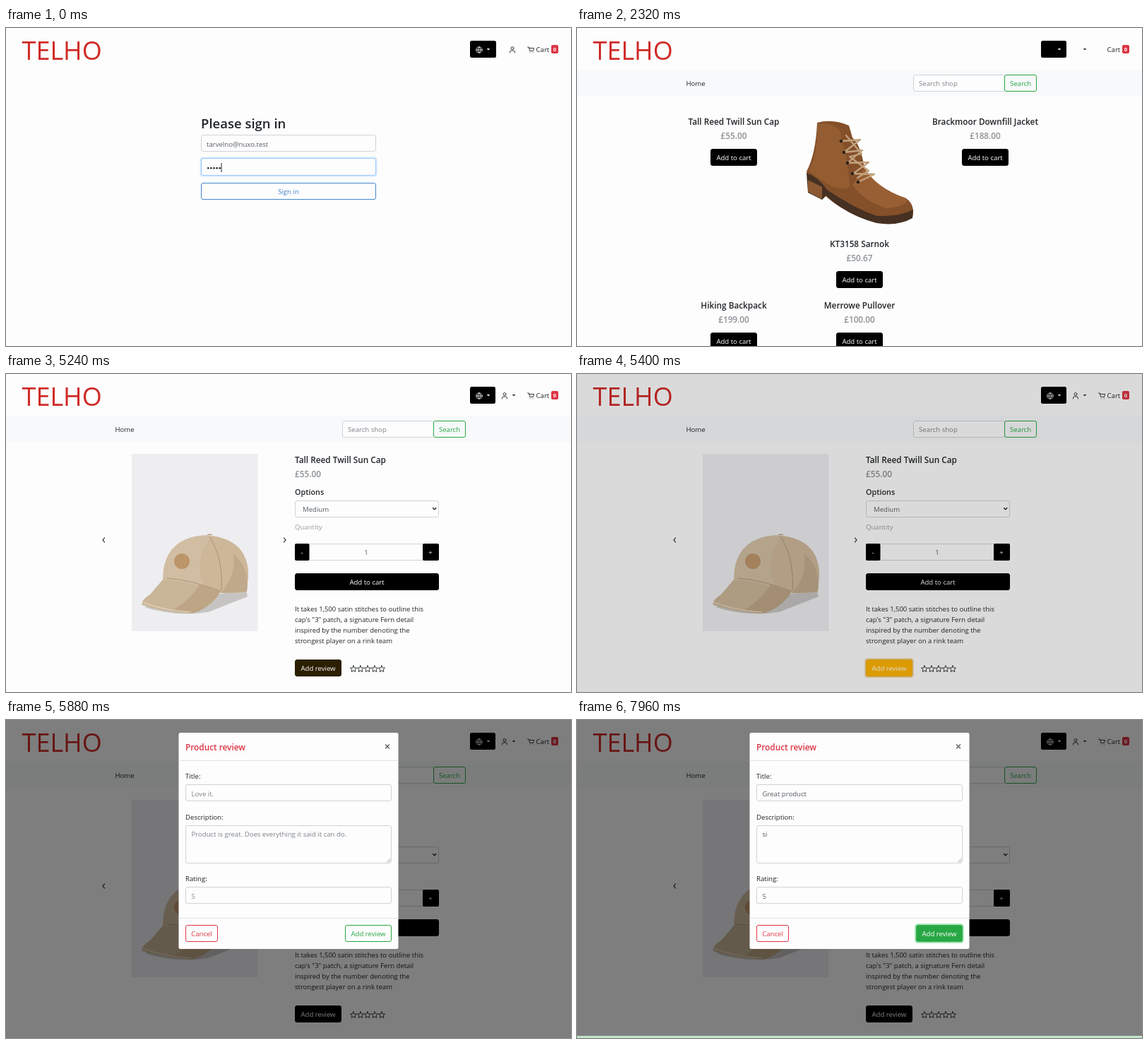
An HTML page for the animation above (8 s loop, 800x450 px).

```html
<!DOCTYPE html>
<html lang="en">
<head>
<meta charset="utf-8">
<title>Shop review</title>
<style>
html, body { margin: 0; width: 100%; height: 100%; overflow: hidden; background: #fdfdfd; }
svg { display: block; width: 800px; height: 450px; font-family: "Open Sans", "Noto Sans", sans-serif; white-space: pre; }
</style>
</head>
<body>
<svg id="stage" viewBox="0 0 800 450"></svg>
<script>
const LOOP = 8000;
const PAGE = '#fdfdfd', INK = '#212529', MUTED = '#7c838a', VALUE = '#565d64', PRICE = '#8c9196', LINE = '#ced4da',
      RED = '#dc3545', GREEN = '#28a745', FOCUS = '#80bdff', FOCUS_GLOW = '#bfdeff';

// Scene times in ms
const SIGN_IN = 1480, LIST = 2240, LOADED = 2400, DETAIL = 3160,
      HOVER_REVIEW = 5215, BACKDROP = 5360, MODAL = 5480, TYPING = 7040,
      DESCRIBE = 7400, RATE = 7520, HOVER_SEND = 7680, TOAST = 7920;

const clamp = v => Math.max(0, Math.min(1, v));
const ramp = (t, start, length) => clamp((t - start) / length);
const easeOut = p => 1 - (1 - p) ** 1.7;
const mix = (a, b, p) => `rgb(${a.map((v, i) => Math.round(v + (b[i] - v) * p))})`;

const rect = (x, y, w, h, fill, extra = '') =>
  `<rect x="${x}" y="${y}" width="${w}" height="${h}" fill="${fill}" ${extra}/>`;
const path = (d, fill = 'none', stroke = 'none', width = 1) =>
  `<path d="${d}" fill="${fill}" stroke="${stroke}" stroke-width="${width}" stroke-linecap="round" stroke-linejoin="round"/>`;
const text = (x, y, s, fill = INK, size = 9.6, weight = 400, anchor = 'start') =>
  `<text x="${x}" y="${y}" fill="${fill}" font-size="${size}" font-weight="${weight}" text-anchor="${anchor}">${s}</text>`;
const label = (x, y, s, fill, size, weight) => text(x, y, s, fill, size, weight, 'middle');
const group = (transform, content, extra = '') => `<g transform="${transform}" ${extra}>${content}</g>`;

const box = (x, y, w, h, stroke = LINE, fill = PAGE) =>
  rect(x + .5, y + .5, w - 1, h - 1, fill, `stroke="${stroke}" rx="2.5"`);
const glow = (x, y, w, h, color) =>
  rect(x - .5, y - .5, w + 1, h + 1, 'none', `stroke="${color}" stroke-width="2.5" stroke-opacity=".5" rx="3"`);
const button = (x, y, w, s, fill = '#000', ink = '#fff', stroke = fill) =>
  box(x, y, w, 24, stroke, fill) + label(x + w / 2, y + 15.5, s, ink);
const caretDown = (x, y, fill) => path(`M${x - 2.3} ${y - 1}h4.6l-2.3 2.5z`, fill);

function header(signedIn, icons) {
  const user = signedIn ? 706 : 717;
  let s = text(22.5, 45, 'TELHO', '#cf2a27', 36)
    + rect(657, 18, signedIn ? 36 : 37, 24, '#000', 'rx="2.5"') + caretDown(683, 30, '#fff')
    + text(750.5, 34, 'Cart') + rect(772, 24, 10, 12, RED, 'rx="2"')
    + label(777, 33, '0', '#fff', 7.5, 700);
  if (signedIn) s += caretDown(719, 30, INK);
  if (icons) s += path('M674.2 31a4.2 4.2 0 1 1-8.4 0a4.2 4.2 0 1 1 8.4 0M665.8 31h8.4M670 26.8q-3.4 4.2 0 8.4q3.4-4.2 0-8.4', 'none', '#fff', .8)
    + path(`M${user - 3.5} 35v-1q0-2 2-2h3q2 0 2 2v1M${user + 2} 28.6a2 2 0 1 1-4 0a2 2 0 1 1 4 0`, 'none', INK, .9)
    + path('M738.5 27h1.8l1.4 5.4h4.8l1-3.9h-6.6M742 34.8v.1M746.3 34.8v.1', 'none', INK, .9);
  return s;
}

const navbar = () => rect(0, 59, 800, 38, '#f8f9fa') + text(154.5, 81.5, 'Home')
  + box(476, 66, 130, 24) + text(484, 82, 'Search shop', MUTED)
  + button(605, 66, 46, 'Search', 'none', GREEN, GREEN);

function login(t) {
  const pressed = t >= SIGN_IN, p = ramp(t, SIGN_IN, 150);
  let s = text(276, 142, 'Please sign in', INK, 18.5, 600)
    + box(276, 151, 248, 24) + text(284, 167.5, 'tarvelno@nuxo.test', VALUE)
    + box(276, 184, 248, 25, pressed ? LINE : FOCUS)
    + (pressed ? '' : glow(276, 184, 248, 25, FOCUS_GLOW));
  for (let i = 0; i < 5; i++) s += `<circle cx="${286.3 + i * 4.1}" cy="198.2" r="1.3" fill="${INK}"/>`;
  if (!pressed && t % 1000 < 500) s += rect(304.5, 191, 1, 13, INK);
  return s + button(276, 219, 248, 'Sign in', mix([253, 253, 253], [40, 125, 215], p),
    mix([64, 128, 200], [255, 255, 255], p), '#4288cc');
}

// Product pictures, each made of a few flat shapes
const capPhoto = rect(178, 113, 178.5, 251, '#eeeef1')
  + path('M196 330Q240 344 286 337L342 315L340 306L240 320Z', '#c6c4c2')
  + path('M222 291Q222 232 282 228Q343 232 343 284L341 308Q300 314 283 303Z', '#d1bea2')
  + path('M291 229Q342 236 343 284L341 308Q310 313 283 303Q262 268 291 229Z', '#cdb799')
  + path('M322 255Q345 273 341 308L304 310Q326 287 322 255Z', '#bfa98b')
  + path('M222 291Q256 293 304 308Q288 333 262 339Q225 337 193 327Q190 321 204 312Z', '#c9b597')
  + path('M304 308Q288 333 262 339L236 335Q262 318 274 298Z', '#bda585')
  + path('M193 323Q225 335 262 337', 'none', '#e5d8c2', 1.2)
  + path('M288 230Q308 260 305 306M228 289Q260 291 303 307', 'none', '#a08a6d', .8)
  + path('M284 228a5 3 0 0 1 9 0z', '#b8a281')
  + '<circle cx="249" cy="265" r="11" fill="#bd956b"/>';

const boot = path('M340 134Q362 128 385 138L390 155Q402 166 407 198Q424 227 466 241Q479 250 475 268Q457 278 426 275Q377 262 350 236Q330 231 325 203Q338 179 340 134Z', '#84502a')
  + path('M340 136Q359 132 372 145L381 181L387 224Q370 237 328 202Q341 178 340 136Z', '#935c31')
  + path('M407 198Q424 227 466 241Q473 251 438 255Q406 245 390 222Z', '#995f34')
  + path('M325 205Q342 211 354 229Q398 258 425 266Q457 267 476 257L475 269Q454 281 424 276Q380 264 353 237L347 243L327 233Z', '#463022')
  + path('M327 215L347 225V242L327 232Z', '#8b5832')
  + path('M375 160L401 158L378 176L404 173L383 191L413 190L391 206L421 207L398 218M381 152L403 178L386 182L413 202L397 212', 'none', '#c1a17d', 2.3)
  + [[374, 160], [378, 176], [383, 191], [390, 206], [398, 218]].map(([x, y]) => `<circle cx="${x}" cy="${y}" r="2.3" fill="#2b211a"/>`).join('');

const jacket = path('M551 128L570 121H587L606 128L626 190L631 268L612 271L602 199L604 285H552L554 199L544 271L525 268L530 190Z', '#535b5c')
  + path('M578 123V284M554 180H602M554 215H602M554 250H602', 'none', '#34393c', 1.3);
const backpack = path('M184 460V420Q185 385 222 385Q259 385 260 420V460Z', '#4d6970')
  + path('M208 389V380Q222 374 236 380V389M194 422H250', 'none', '#293f45', 4);
const pullover = path('M370 391L388 382Q400 391 412 382L430 391L458 460H342Z', '#9b776b')
  + path('M388 382Q400 398 412 382', 'none', '#73574e', 3);

const card = (cx, y, name, price) => label(cx, y + 17, name, INK, 11.8, 600)
  + label(cx, y + 37, price, PRICE, 11.8, 600) + button(cx - 33, y + 51, 66, 'Add to cart');

function list(loaded) {
  const shift = loaded ? 173 : 0;
  let s = boot + card(222, 120 + shift, 'Tall Reed Twill Sun Cap', '£55.00')
    + card(400, 293, 'KT3158 Sarnok', '£50.67')
    + card(578, 120 + shift, 'Brackmoor Downfill Jacket', '£188.00');
  return s + (loaded
    ? group('translate(43 44) scale(.67)', capPhoto) + jacket + backpack + pullover
    : card(222, 380, 'Hiking Backpack', '£199.00') + card(400, 380, 'Merrowe Pullover', '£100.00'));
}

function star(cx, cy) {
  const points = Array.from({ length: 10 }, (_, i) => {
    const a = i * Math.PI / 5 - Math.PI / 2, r = i % 2 ? 2.2 : 4.8;
    return `${(cx + r * Math.cos(a)).toFixed(2)} ${(cy + r * Math.sin(a)).toFixed(2)}`;
  });
  return path(`M${points.join('L')}Z`, 'none', INK, .9);
}

function detail(t) {
  const hover = ramp(t, HOVER_REVIEW, 150) - ramp(t, MODAL + 160, 150);
  let s = capPhoto + path('M139.5 232l-2.5 3l2.5 3M393.5 232l2.5 3l-2.5 3', 'none', '#444', 1.2)
    + text(409, 126, 'Tall Reed Twill Sun Cap', INK, 11.8, 600)
    + text(409, 146, '£55.00', PRICE, 11.8, 600)
    + text(409, 171, 'Options', INK, 10.8, 600)
    + box(409, 179, 204, 24) + text(420, 194.5, 'Medium', VALUE)
    + path('M604.5 189.5l2.2 2.3l2.2-2.3', 'none', INK, 1.3)
    + text(409, 220, 'Quantity', '#999da2')
    + box(409, 240, 204, 24) + rect(409, 240, 20.5, 24, '#000', 'rx="2"') + rect(590, 240, 23, 24, '#000', 'rx="2"')
    + label(419, 255.5, '-', '#fff') + label(601, 256, '+', '#fff') + label(510, 256, '1', VALUE)
    + button(409, 282, 204, 'Add to cart');
  ['It takes 1,500 satin stitches to outline this', 'cap\'s "3" patch, a signature Fern detail',
    'inspired by the number denoting the', 'strongest player on a rink team']
    .forEach((line, i) => s += text(409, 336 + i * 15, line, INK, 9.5));
  s += button(409, 404, 66, 'Add review', mix([0, 0, 0], [255, 180, 0], hover));
  if (t > BACKDROP - 60 && hover > 0) s += glow(409, 404, 66, 24, '#dda63a');
  for (let i = 0; i < 5; i++) s += star(492 + i * 10, 417.5);
  return s;
}

function modal(t) {
  const field = (y, h, from, to) => {
    const focused = t >= from && t < to;
    return box(254, y, 292, h, focused ? FOCUS : LINE) + (focused ? glow(254, y, 292, h, FOCUS_GLOW) : '');
  };
  const entry = (y, start, step, value, placeholder) => {
    const count = Math.floor((t - start) / step);
    return count > 0 ? text(262.5, y, value.slice(0, count), VALUE) : text(262.5, y, placeholder, MUTED);
  };
  const hover = ramp(t, HOVER_SEND, 150);
  const s = rect(244.5, 18, 311, 306, PAGE, 'rx="2.5"')
    + text(254, 42.5, 'Product review', RED, 11.8, 600)
    + path('M537.5 35l5 5m0-5l-5 5', 'none', '#666', 1.6)
    + path('M245 57.5H555M245 280.5H555', 'none', '#dee2e6')
    + text(254, 83, 'Title:') + field(91, 24, TYPING - 30, DESCRIBE - 20)
    + entry(107.5, TYPING, 23, 'Great product', 'Love it.')
    + text(254, 140.5, 'Description:') + field(149, 54, DESCRIBE - 20, RATE - 20)
    + entry(164.5, DESCRIBE, 40, 'si', 'Product is great. Does everything it said it can do.')
    + path('M539.5 201l4.5-4.5M542 201l2-2', 'none', '#888', .8)
    + text(254, 228, 'Rating:') + field(236, 24, RATE - 20, HOVER_SEND + 120)
    + entry(252.5, RATE, 40, '5', '5')
    + button(254, 290, 46, 'Cancel', PAGE, RED, RED)
    + button(480, 290, 66, 'Add review', mix([253, 253, 253], [40, 167, 69], hover),
      mix([40, 167, 69], [255, 255, 255], hover), GREEN)
    + (t >= HOVER_SEND + 120 ? glow(480, 290, 66, 24, '#48c767') : '');
  const lift = -50 * (1 - easeOut(ramp(t, MODAL, 240)));
  return group(`translate(0 ${lift.toFixed(2)})`, s, `opacity="${ramp(t, MODAL + 40, 200)}"`);
}

function scene(t) {
  let s = rect(0, 0, 800, 450, PAGE) + header(t >= LIST, t < LIST || t >= LOADED);
  if (t < LIST) return s + login(t);
  s += navbar() + (t < DETAIL ? list(t >= LOADED) : detail(t));
  if (t >= BACKDROP) s += rect(0, 0, 800, 450, '#000', `opacity="${ramp(t, BACKDROP, 150) / 2}"`);
  if (t >= MODAL) s += modal(t);
  if (t >= TOAST) {
    const h = (t - TOAST) / 40 * 3;
    s += rect(0, 450 - h, 800, h, '#c3e6cb');
  }
  return s;
}

const stage = document.getElementById('stage');
let shown = '';
function frame(now) {
  const next = scene(now % LOOP);
  if (next !== shown) stage.innerHTML = shown = next;
  requestAnimationFrame(frame);
}
frame(0);
</script>
</body>
</html>
```
